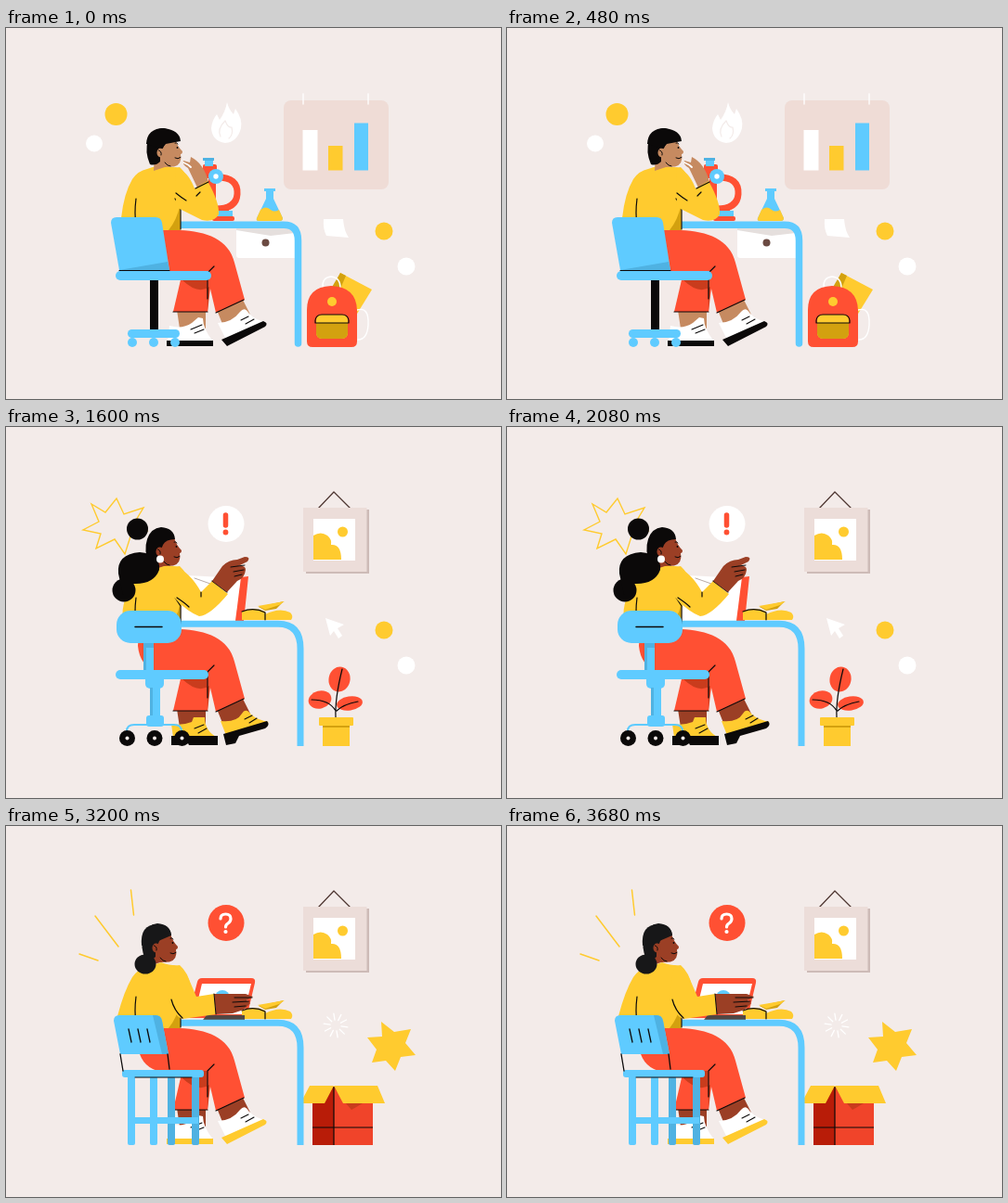
An HTML page with a canvas that plays this animation: 533x400 px, repeating every 4 s.

```html
<!DOCTYPE html>
<html lang="en">
<head>
<meta charset="utf-8">
<title>Study desk</title>
<style>
html, body { margin: 0; width: 100%; height: 100%; overflow: hidden; background: #f3ebe9; }
canvas { display: block; width: 533px; height: 400px; }
</style>
</head>
<body>
<canvas id="stage"></canvas>
<script>
const canvas = document.getElementById('stage');
const ctx = canvas.getContext('2d');
const ratio = window.devicePixelRatio || 1;
canvas.width = 533 * ratio;
canvas.height = 400 * ratio;

const HOLD = 800;
const PAPER = '#f3ebe9', BLUE = '#5fcbff', SHADE = '#4fb2e2', YELLOW = '#ffcb2f', GOLD = '#d3a10f';
const RED = '#ff5033', RUST = '#c93c1d', INK = '#0b0909', WHITE = '#ffffff', PINK = '#efdcd6';
const TAN = '#c68a60', BROWN = '#9b3f25', ROSE = '#d9978b', PLUM = '#7a1631';

// Drawing helpers
function fill(color, d) {
  ctx.fillStyle = color;
  ctx.fill(new Path2D(d));
}
function line(color, width, d, cap = 'round') {
  ctx.strokeStyle = color;
  ctx.lineWidth = width;
  ctx.lineCap = cap;
  ctx.lineJoin = cap === 'round' ? 'round' : 'miter';
  ctx.stroke(new Path2D(d));
}
function oval(color, x, y, rx, ry = rx, turn = 0) {
  ctx.fillStyle = color;
  ctx.beginPath();
  ctx.ellipse(x, y, rx, ry, turn, 0, Math.PI * 2);
  ctx.fill();
}
function box(color, x, y, w, h, r = 0) {
  ctx.fillStyle = color;
  ctx.beginPath();
  ctx.roundRect(x, y, w, h, r);
  ctx.fill();
}
function shifted(x, y, draw) {
  ctx.save();
  ctx.translate(x, y);
  draw();
  ctx.restore();
}
function text(str, x, y, size, style = '') {
  ctx.font = `${style} ${size}px Lato, sans-serif`;
  ctx.fillStyle = INK;
  ctx.fillText(str, x, y);
}

// Furniture
function drawerDesk() {
  box(WHITE, 248, 217, 63, 31, [0, 0, 0, 3]);
  fill('#e5dfdd', 'M248 216H311V221L285 224L248 218Z');
  oval('#6b4a42', 279.5, 231.5, 4);
  line(BLUE, 7.5, 'M186 212.3H299Q314.5 212.3 314.5 229V340');
}
function plainDesk() {
  line(BLUE, 7, 'M180 212.3H293Q317 212.3 317 239V344', 'butt');
}
function backrest() {
  fill(BLUE, 'M116 210Q116 204 122 204H161Q167 204 168 210L175 246H123Z');
  fill(SHADE, 'M158 204H161Q167 204 168 210L175 246H168Z');
  line(INK, 1.3, 'M132 219L135 233M142 219L145 233M152 219L155 233M123 246L126 264M174 246L176 262');
}
function woodenChair() {
  box(BLUE, 155, 270, 8, 74, 2);
  box(SHADE, 174, 270, 8, 74, 2);
  box(SHADE, 200, 268, 8, 76, 2);
  box(BLUE, 131, 268, 8, 76, 2);
  box(BLUE, 133, 314, 74, 7);
  box(BLUE, 125, 263, 88, 8, 3);
  line(INK, 1, 'M139 271H200');
}
function officeChair() {
  fill(BLUE, 'M113 210Q113 204 119 204H161Q167 204 168 210L176 261H122Z');
  fill(SHADE, 'M122 261L174 252L176 261Z');
  line(INK, 1, 'M122 261.5H176');
  box(INK, 155, 271, 9, 55);
  box(BLUE, 118, 262, 103, 10, 5);
  box(BLUE, 131, 325, 56, 9, 4.5);
  for (const x of [136, 159, 182]) oval(BLUE, x, 339, 5);
}
function swivelChair() {
  box(SHADE, 148, 232, 11, 31);
  box(BLUE, 151, 238, 8, 25);
  box(BLUE, 119, 198, 70, 35, 15);
  line(INK, 1.5, 'M139 215.5H168');
  box(BLUE, 118, 262, 100, 10, 5);
  box(BLUE, 150, 271, 20, 11, [0, 0, 5, 5]);
  box(SHADE, 155, 281, 11, 32);
  box(BLUE, 158, 281, 8, 32);
  box(BLUE, 151, 311, 19, 12, 3);
  line(BLUE, 2, 'M130 328Q130 321 138 321H181Q189 321 189 328');
  for (const x of [130.5, 160, 189.5]) {
    oval(INK, x, 335.5, 8.5);
    oval(PAPER, x, 335.5, 2);
  }
}
function stool() {
  line(INK, 1.2, 'M158 272L142 343M190 272L203 343M151 299H196');
  box(BLUE, 156, 272, 8, 72);
  box(BLUE, 145, 262, 57, 11, 5.5);
}

// People
function head(skin, hair, x, y) {
  shifted(x, y, () => {
    fill(skin, 'M160 119H181Q183 127 189 133Q189 136 187 136Q189 147 180 149.5L170 150L158 154Z');
    fill(hair, 'M154 147Q148 133 152 121Q156 109 167 108Q181 109 182 121Q172 121 169 127Q168 131 165 132V144Q160 149 154 147Z');
    oval(skin, 165.5, 134.5, 4, 5);
    line(INK, 1, 'M163.5 132Q167 133 166 137M170 145Q173 149 176 149M181 140Q184 142 187 139.5M181 124Q182.5 123 184 125');
    oval(INK, 183.5, 129, .9);
  });
}
function torso(left) {
  fill(YELLOW, `M152 152Q158 150 167 147Q178 151 187 150Q196 158 199 172L188 195V218H${left + 8}L${left} 205Q127 178 136 163Q142 154 152 152Z`);
  fill(GOLD, 'M187 192V218H175Q184 207 187 192Z');
  line(INK, 1.2, 'M140 184Q138 200 140 212M182 184L188 193V217');
}
function crossedLegs(skin) {
  fill(skin, 'M184 304H215V324H187ZM227 304L254 291L263 309L235 324Z');
  fill(RED, 'M190 263H222L217 306H180Z');
  fill(RUST, 'M190 272Q207 288 219 279L217 306L216 264H192Z');
  fill(RED, 'M147 218H187C216 219 240 228 246 253L257 293L226 307L216 264H163Q144 258 142 236Q142 224 147 218Z');
  line(INK, 1.2, 'M180 306H217M226 307L256 293M217 292V264L224 257');
}
function boots() {
  fill(YELLOW, 'M178 320Q190 322 200 318L202 313H214Q214 328 228 335H180Z');
  fill(INK, 'M178 333H228V343H197Q193 334 190 343H178Z');
  fill(YELLOW, 'M231 317Q248 319 254 309Q258 302 264 310Q271 316 283 318L238 335Z');
  fill(INK, 'M234 331L281 317Q285 321 279 325L251 333L247 341L237 343Z');
  line(INK, 1.1, 'M203 325L213 321M207 330L216 325M257 315L265 311M262 319L270 314');
}
function sneakers(sole) {
  fill(WHITE, 'M176 321Q190 325 200 318L207 312L212 313Q212 324 223 338H174Z');
  fill(WHITE, 'M228 318Q243 318 252 306Q257 300 261 307Q268 315 280 317L237 336Z');
  fill(sole, 'M173 337H223V343H173ZM232 336L277 316Q283 318 279 322L238 343Z');
  line(INK, 1.1, 'M199 325L211 320M203 329L213 325M253 315L261 311M258 319L267 314');
}
function pointingWoman(chair) {
  fill(YELLOW, 'M138 164Q121 194 127 212L142 230L153 218Z');
  fill(BROWN, 'M137 220L150 218L143 230Z');
  torso(127);
  line(INK, 1.2, 'M141 210L147 206');
  head(BROWN, INK, 0, 0);
  oval(INK, 141.5, 110, 11.5);
  oval(INK, 127, 176, 12.5);
  fill(INK, 'M121 158Q119 137 144 135Q167 137 165 154Q159 170 137 169L126 181Z');
  oval(WHITE, 166, 142.5, 4);
  crossedLegs(BROWN);
  fill(YELLOW, 'M181 150Q198 156 210 178L222 166L239 180Q220 203 208 204Q195 199 181 184Z');
  line(INK, 1.2, 'M184 184Q193 190 197 194M210 178V183M222 166L238 178');
  fill(BROWN, 'M222 166L233 150Q240 143 249 143L257 140Q264 140 260 145L250 150Q258 149 258 154Q257 163 249 166L238 178Z');
  line(INK, 1, 'M242 151L257 149M245 156L256 154M246 161L254 159');
  boots();
  chair();
}

// Desk and floor objects
function microscope() {
  line(RED, 7, 'M228 161Q250 161 249 179Q248 195 226 195');
  box(RED, 218, 148, 8, 46, 2);
  box(RED, 212, 147, 15, 15, 2);
  box(BLUE, 214, 141, 9, 8);
  box(SHADE, 212, 140, 12, 3);
  oval(BLUE, 226, 160, 8);
  oval(WHITE, 226, 160, 2.7);
  box(RED, 229, 193, 11, 6);
  box(BLUE, 227, 197, 17, 6);
  box(RED, 222, 203, 24, 5, 2);
}
function flask() {
  fill(BLUE, 'M278 173H290V176H288V184L298 205Q298 208 295 208H272Q269 208 270 205L280 184V176H278Z');
  fill(YELLOW, 'M274 196Q280 191 285 196Q289 199 294 196L298 205Q298 208 295 208H272Q269 208 270 205Z');
}
function openBook() {
  fill(YELLOW, 'M254 199Q267 193 279 199L280 208H254ZM279 202Q295 194 306 200Q310 204 307 208H279Z');
  fill(GOLD, 'M279 198L272 194L299 188L291 196Z');
  fill(YELLOW, 'M271 193L300 188L294 192L279 197Z');
  line(INK, 1.2, 'M254 199Q267 194 279 200V208');
}
function schoolBag() {
  line(INK, 1.3, 'M347 273V270Q347 264 355 264Q363 264 363 270V273');
  fill(YELLOW, 'M325 319Q329 289 336 279Q343 272 355 272Q368 272 374 279Q382 290 385 319Z');
  fill(GOLD, 'M333 284L376 284Q377 304 361 310Q347 311 339 302Z');
  fill(RED, 'M333 283Q340 272 355 272Q370 273 377 283Q375 299 363 304Q351 307 342 302Q333 295 333 283Z');
  line(INK, 1.3, 'M347 290H364');
  box(RED, 324.5, 318, 61, 26, [2, 2, 9, 9]);
  line(RUST, 1, 'M326 318H384');
}
function redPack() {
  fill(YELLOW, 'M360 264L394 282L375 313L348 291Z');
  fill(GOLD, 'M360 264L366 267L358 286L350 281Z');
  line(WHITE, 1.4, 'M341 280Q340 269 350 268Q360 269 360 280M378 304Q391 300 390 320Q389 336 379 336');
  fill(RED, 'M324 304Q324 279 350 278Q377 279 378 304V338Q378 344 372 344H330Q324 344 324 338Z');
  oval(YELLOW, 351, 295, 5);
  box(YELLOW, 334, 309, 34, 26, 6);
  box(GOLD, 334, 318, 34, 17, [0, 0, 6, 6]);
  line(INK, 1.2, 'M333 318V315Q334 309 340 309H362Q368 309 369 315V318Z');
}
function plant() {
  oval(RED, 359, 272, 11.5, 13.5, .2);
  oval(RED, 338, 294, 12.5, 9.5, -.25);
  oval(RED, 370, 298, 14, 7.5, -.15);
  line(INK, 1.2, 'M355 313Q354 293 362 261M355 306Q348 294 329 294M356 306Q363 299 379 296');
  box(YELLOW, 341, 320, 29, 24);
  box(GOLD, 341, 321, 29, 3);
  box(YELLOW, 337, 313, 37, 9, 1);
}
function crate() {
  box('#f0442a', 330, 281, 65, 63);
  box('#b81c08', 330, 281, 23, 63);
  fill(RUST, 'M353 282L366 299L372 306L384 299Z');
  line(INK, 1.2, 'M353 281V344M330 325H395', 'butt');
  fill(YELLOW, 'M327 280H353L343 299H317ZM353 280H400L408 299H363Z');
}

// Wall decorations
function landscapePicture() {
  line('#4d3530', 1.2, 'M336 88L353 70L371 88');
  box('#cdbbb7', 323, 89, 68, 69);
  box('#ecddd9', 320, 87, 68.5, 69);
  box(WHITE, 331, 99, 45, 45);
  oval(YELLOW, 362.5, 113, 5.5);
  fill(YELLOW, 'M331 117Q339 112 346 117Q351 121 350 127Q361 126 361 143H331Z');
}
function flowerPicture() {
  box(PINK, 308, 79, 94, 92);
  box(WHITE, 319, 89, 72, 72);
  line(INK, 1.1, 'M353 121C340 109 344 97 354 97C365 98 364 110 361 119C365 107 382 104 381 114C380 122 369 124 364 126C377 122 386 133 381 138C374 143 366 137 363 132C377 147 372 153 366 149C360 145 360 140 359 135C355 155 340 150 341 142C344 136 350 138 354 141M352 124C341 117 329 121 330 129C333 136 345 135 351 128C344 133 335 139 338 144C345 150 354 139 356 134');
}
function chartBoard() {
  box(PINK, 299, 78, 113, 96, 8);
  line(WHITE, 1.3, 'M320 71V82M390 71V82');
  box(WHITE, 319.5, 110, 16, 43.5);
  box(YELLOW, 347, 127, 15.5, 26.5);
  box(BLUE, 375, 102.5, 15, 51);
}
function pyramidBoard() {
  box(PINK, 287, 75, 137, 99, 5);
  line(INK, 1.2, 'M331 90L299 142L331 161L362 142ZM331 90V161M331 90L325 132L299 142M325 132L362 142');
  text('V=', 357, 106, 15);
  text('1', 375.5, 98, 12);
  text('3', 375.5, 112, 12);
  text('S', 385, 106, 15);
  text('h', 397, 106, 15, 'italic');
  line(INK, 1.2, 'M374 100.5H384');
}
function burst() {
  line(YELLOW, 1.4, 'M92 83L107 92L119 77L127 94L148 87L139 102L152 112L134 118L128 137L117 121L97 131L102 115L83 111L100 102Z', 'butt');
}
function alertBubble() {
  oval(WHITE, 237, 104.5, 19.5);
  line(RED, 5.5, 'M236.5 95V106');
  oval(RED, 236.5, 113.5, 2.9);
}
function sparkle() {
  for (let i = 0; i < 10; i++) {
    const a = i * Math.PI / 5 + .15, c = Math.cos(a), s = Math.sin(a);
    line(WHITE, 1.3, `M${355 + 6 * c} ${215 + 6 * s}L${355 + 13 * c} ${215 + 13 * s}`);
  }
}
function sideDots() {
  oval(YELLOW, 407, 219, 9.5);
  oval(WHITE, 431, 257, 9.5);
}
function paperScrap() {
  fill(WHITE, 'M342 206L363 206Q364 219 369 226L345 224Q341 216 342 206Z');
}

const scenes = [
  function manWithMicroscope() {
    oval(YELLOW, 118.5, 93, 12);
    oval(WHITE, 95, 124.5, 9);
    fill(WHITE, 'M238 80Q240 88 245 93L247 87Q255 98 253 108Q249 123 236 124Q222 122 221 108Q222 99 227 93L230 99Q236 91 238 80Z');
    line(PAPER, 1.2, 'M231 117Q227 109 236 100Q239 108 243 107Q245 115 240 119');
    chartBoard();
    paperScrap();
    sideDots();
    redPack();
    microscope();
    flask();
    drawerDesk();
    torso(124);
    head(TAN, INK, 1, 0);
    fill(INK, 'M151 125Q152 108 170 108Q187 110 188 122L172 125L168 130Z');
    crossedLegs(TAN);
    fill(TAN, 'M206 172L196 151Q189 147 191 143L198 145L199 139Q213 146 218 166Z');
    line(WHITE, 1.8, 'M191 145Q196 147 199 150');
    fill(YELLOW, 'M182 150Q196 154 203 173L217 165Q230 188 229 201Q224 210 211 207L183 193Z');
    line(INK, 1.2, 'M183 178Q189 183 194 186M204 173L218 166M205 181L209 177');
    sneakers(INK);
    officeChair();
  },
  function womanWithPaper() {
    fill(YELLOW, 'M106 84L141 125L83 104Z');
    alertBubble();
    flowerPicture();
    paperScrap();
    sideDots();
    schoolBag();
    fill(WHITE, 'M203 157L256 163L248 209H190Z');
    fill(BLUE, 'M230 170H250L247 187H226Z');
    line(INK, 1.4, 'M206 163H220M204 168H217M222 193H230M237 193H246M220 198H229M235 198H245M219 203H228M234 203H243');
    fill(GOLD, 'M281 177H299V208H281Z');
    fill(YELLOW, 'M281 177H291V208H281ZM265 193H284V208H265Z');
    oval(BLUE, 290, 177, 9, 5);
    oval(BLUE, 275, 193, 10, 4);
    fill(GOLD, 'M277 197H284V208H277Z');
    line(INK, 1.2, 'M290 170V178M275 187V194M284 196V208');
    plainDesk();
    pointingWoman(stool);
  },
  function womanWithFolder() {
    burst();
    alertBubble();
    landscapePicture();
    fill(WHITE, 'M344 206L364 213L357 217L362 225L358 228L353 220L349 225Z');
    sideDots();
    plant();
    fill(WHITE, 'M194 160L254 163L247 209H189Z');
    line('#b8aaa6', 1, 'M203 163L220 169');
    fill(RED, 'M253 162L261 161L256 209H247Z');
    openBook();
    plainDesk();
    pointingWoman(swivelChair);
  },
  function womanWithFormula() {
    burst();
    box(WHITE, 211, 87, 53, 30, 15);
    fill(WHITE, 'M222 112L238 114L224 124Z');
    for (const x of [228.5, 237, 245.5]) oval(RED, x, 101.5, 2);
    pyramidBoard();
    sparkle();
    fill(YELLOW, 'M407 205L416 222L438 216L426 237L446 243L423 248L425 270L411 252L394 264L402 245L385 234L404 230Z');
    schoolBag();
    microscope();
    box(WHITE, 278, 171, 8, 20);
    fill(BLUE, 'M278 171L282 165L286 171V186H278Z');
    fill(WHITE, 'M279 170H285V175H279Z');
    fill(RED, 'M287 170L292 163L298 170L294 187H286Z');
    fill(INK, 'M289 167L292 163L296 168Z');
    fill(YELLOW, 'M274 184H298L296 208H277Z');
    fill('#493811', 'M276 194H297L296 208H277Z');
    drawerDesk();
    torso(142);
    head(ROSE, PLUM, 5, -3);
    fill(PLUM, 'M157 125Q157 106 172 105Q188 106 189 119L172 124Z');
    oval(PLUM, 153, 98, 12.5);
    oval(PLUM, 149, 153, 19, 18);
    oval(PLUM, 136, 164, 17);
    oval('#5f1027', 131, 177, 18.5);
    oval(PLUM, 130, 174, 17.5);
    line('#a64358', 1, 'M134 148Q132 160 147 166M144 101Q150 108 158 103');
    fill(ROSE, 'M208 296H256L250 315Q252 325 264 331H212Z');
    fill(RED, 'M143 216H188C232 219 254 226 255 252V299H208L211 263H150Q142 252 142 230Z');
    line(INK, 1.2, 'M211 263H228M168 215H188');
    line('#9d3a2a', 1, 'M242 263Q246 286 239 307L247 331');
    fill(YELLOW, 'M211 327L217 324L223 335Q236 335 239 325Q250 331 255 323Q267 326 276 338H211Z');
    box(INK, 211, 337, 65, 6.5, 1);
    fill(YELLOW, 'M181 150Q199 158 207 188L215 185L232 203Q218 221 208 220Q195 214 181 192Z');
    fill(RED, 'M211 187L219 181L235 197L229 205Z');
    fill(ROSE, 'M218 181L233 166L247 160L260 162Q264 165 257 167L264 168L259 175L243 181L231 193Z');
    line(INK, 1, 'M246 165L261 163M248 170L263 168M250 174L259 173');
    line(INK, 1.2, 'M184 187L193 195M207 188L209 193');
    woodenChair();
    backrest();
  },
  function womanWithTablet() {
    line(YELLOW, 1.5, 'M134.5 69L137.5 96M96 97L121 130M79 138L99 145');
    oval(RED, 237, 104.5, 19.5);
    line(WHITE, 3.2, 'M231 100Q231 95 236.5 95Q242 95 242 100Q242 103 239 105Q236.5 106.5 236.5 109');
    oval(WHITE, 236.5, 114, 2.1);
    landscapePicture();
    sparkle();
    fill(YELLOW, 'M404 211L418 222L436 219L430 234L441 247L425 249L419 264L409 253L394 255L399 241L389 228L405 227Z');
    crate();
    fill(RED, 'M206 168Q207 164 211 164H264Q269 164 268 169L259 207H196Z');
    fill(WHITE, 'M211 170H264L256 203H203Z');
    oval(BLUE, 233, 185, 8);
    openBook();
    fill('#524744', 'M216 204H257V209H212Z');
    plainDesk();
    torso(120);
    head(BROWN, '#171718', -4, -3);
    fill('#171718', 'M146 129Q144 106 163 106Q177 107 178 118L164 124Z');
    oval('#171718', 150, 149, 11.5, 10.5);
    crossedLegs(BROWN);
    fill(YELLOW, 'M180 150Q192 153 199 170L205 184L224 181L226 203L190 208Q181 205 174 188Z');
    fill(BROWN, 'M224 181L258 181L266 184L259 188L263 191L256 198L244 202L226 203Z');
    line(INK, 1, 'M246 185H265M244 190L262 189M246 195L258 194M224 181L226 203');
    line(INK, 1.2, 'M178 187Q181 199 190 207');
    sneakers(YELLOW);
    woodenChair();
    backrest();
  }
];

function render() {
  ctx.setTransform(ratio, 0, 0, ratio, 0, 0);
  box(PAPER, 0, 0, 533, 400);
  scenes[Math.floor(performance.now() / HOLD) % scenes.length]();
  requestAnimationFrame(render);
}
render();
</script>
</body>
</html>
```
